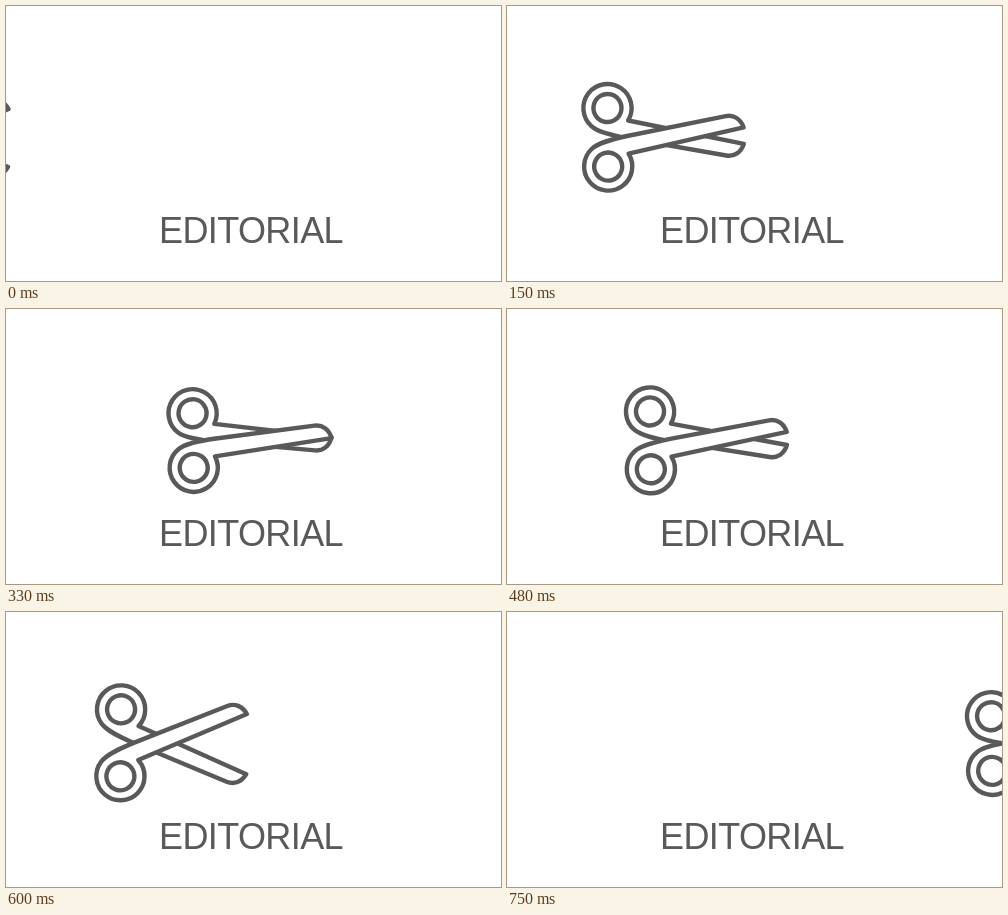
Animation of 495x275 px, one loop 780 ms. Source, as an HTML page:

```html
<!DOCTYPE html>
<html lang="en">
<head>
<meta charset="utf-8">
<title>Editorial</title>
<style>
  html, body { margin: 0; width: 100%; height: 100%; overflow: hidden; background: #fff; }
  svg { display: block; width: 495px; height: 275px; }
  .blade { fill: #fff; stroke: #59595b; stroke-width: 4.4; stroke-linejoin: round; }
  text { font: 36px "Liberation Sans", Arial, sans-serif; letter-spacing: -.6px; fill: #59595b; }
</style>
</head>
<body>
<svg viewBox="0 0 495 275">
  <defs>
    <!-- ring centre at the origin, inner tip on the x axis -->
    <g id="half" class="blade">
      <path d="M23.2-6.8A24.1 24.1 0 1 1-11-21.5C-3-25.6 10-25.3 28-24L127-15.8C135-15.2 140.5-9 141 0Z"/>
      <circle r="14"/>
    </g>
  </defs>
  <use id="back" href="#half"/>
  <use id="front" href="#half"/>
  <text x="153" y="237">EDITORIAL</text>
</svg>
<script>
const LOOP = 780, STEP = 30, PIVOT_Y = 131;
const back = document.getElementById('back');
const front = document.getElementById('front');

// [time, value, speed per ms]
const slide = [
  [0, -106, 1.8], [150, 125, 1.27], [210, 184, .65], [330, 213.5, .07],
  [375, 216, 0], [570, 130, 0]
];
const opening = [
  [0, 1, -.007], [150, .29, -.0045], [210, .1, -.002], [330, 0, 0], [375, 0, 0]
];
const closing = [[570, 1.7, -.02], [660, .08, -.004], [690, 0, 0], [780, 0, 0]];

function curve(keys, t) {
  let i = 0;
  while (i < keys.length - 2 && t >= keys[i + 1][0]) i++;
  const [t0, a, va] = keys[i], [t1, b, vb] = keys[i + 1];
  const d = t1 - t0, u = (t - t0) / d, w = 1 - u;
  return w * w * (a * (1 + 2 * u) + va * d * u) + u * u * (b * (1 + 2 * w) - vb * d * w);
}

function pivotX(t) {
  return t < 570 ? curve(slide, t) : 130 + 381 * ((t - 570) / 180) ** 2.77;
}

function spread(t) {
  if (t < 375) return curve(opening, t);
  return t < 570 ? 1.7 * ((t - 375) / 195) ** 3.2 : curve(closing, t);
}

function place(el, x, angle, flip) {
  el.setAttribute('transform',
    `translate(${x} ${PIVOT_Y}) scale(1 ${flip}) rotate(${-angle}) translate(-31.1 21.8)`);
}

function draw() {
  const t = Math.floor(performance.now() % LOOP / STEP) * STEP;
  const x = pivotX(t), s = spread(t);
  place(back, x, 9.8 + 16.9 * s, -1);
  place(front, x, 12.2 + 13.5 * s, 1);
  requestAnimationFrame(draw);
}
draw();
</script>
</body>
</html>
```
